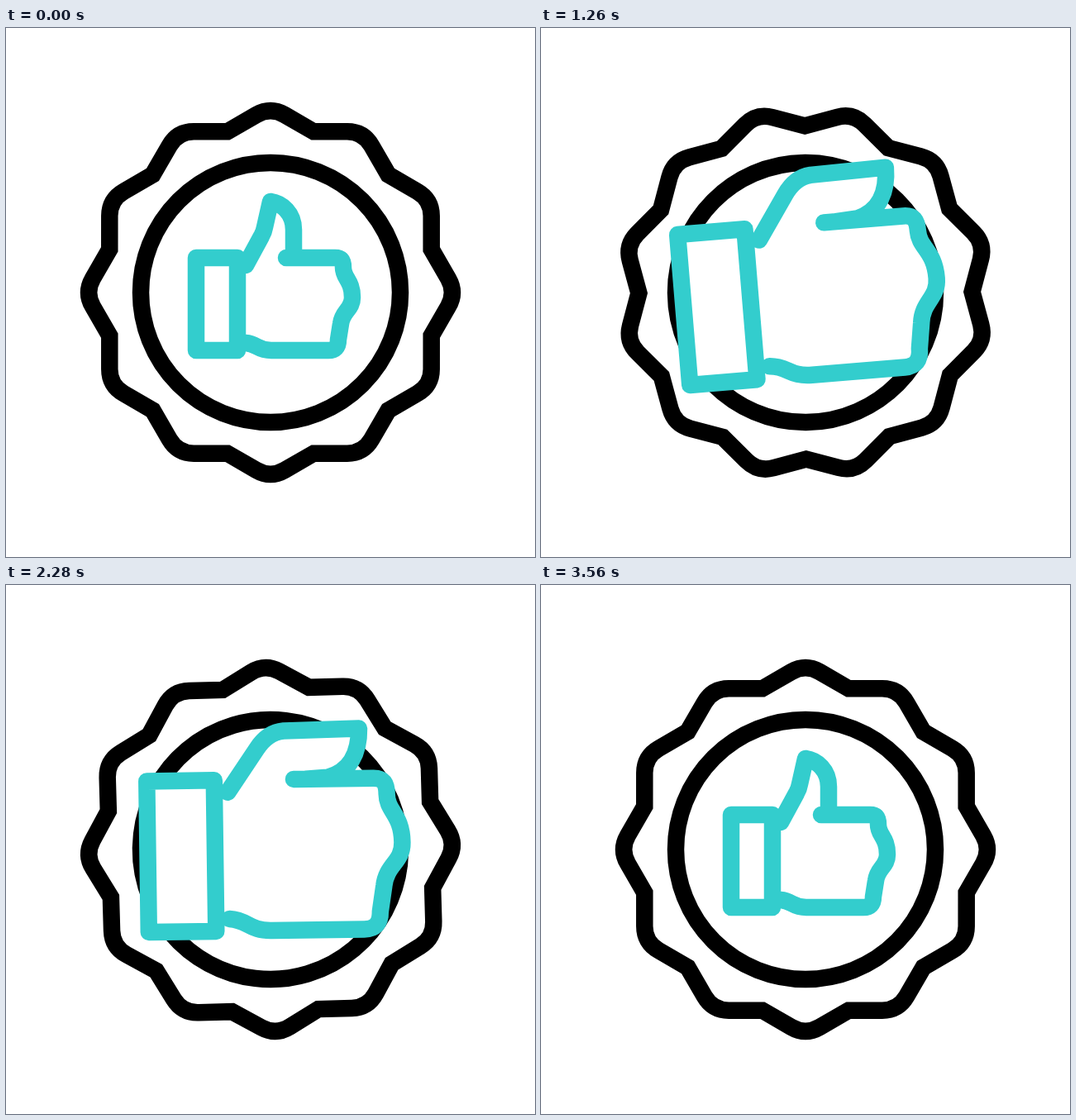
An HTML page with a canvas for the animation above (3600 ms loop, 640 px wide and 640 px high).

```html
<!DOCTYPE html>
<html lang="en">
<head>
<meta charset="utf-8">
<title>Approval badge</title>
<style>
  html, body { margin: 0; height: 100%; overflow: hidden; background: #fff; }
  canvas { display: block; }
</style>
</head>
<body>
<canvas id="stage" width="640" height="640"></canvas>
<script>
const ctx = document.getElementById('stage').getContext('2d');
const LOOP = 3600, START = 100, END = 3340, FULL = 1.63;

const cuff = 'M230 278H280V390H230Z';
const palm = 'M339 278H398C406 278 408 282 408 290C408 303 419 305 419 326' +
  'C419 341 407 342 405 358L402 377C402 386 398 390 390 390H321C304 390 304 382 290 381';
const palmAndCuff = new Path2D(cuff + palm);

// Thumb outline: each point upright, then bent
const thumb = [
  [309, 252, 312, 255], [312, 247, 320, 243], [313, 241, 332, 242], [320, 210, 388, 241],
  [334, 212, 388, 259], [348, 224, 381, 273], [348, 244, 364, 277]
];

// Nodding: time, turn in degrees, height of the hand's centre
const nods = [
  [START, 0, 313], [580, 0, 318], [1060, -17.6, 270], [1510, 13, 328],
  [1960, -17.6, 270], [2410, 3.4, 298], [2900, -17.6, 270], [END, 0, 313]
];

const mix = (a, b, k) => a + (b - a) * k;
const smooth = u => u * u * (3 - 2 * u);
const progress = (t, from, to) => Math.min(1, Math.max(0, (t - from) / (to - from)));
const phase = (t, from, to) => smooth(progress(t, from, to));

// cubic-bezier(.333, 0, .82, 1)
function spinEase(x) {
  let low = 0, high = 1;
  for (let i = 0; i < 24; i++) {
    const s = (low + high) / 2, r = 1 - s;
    if (r * r * s + 2.46 * r * s * s + s ** 3 < x) low = s; else high = s;
  }
  return smooth(low);
}

function nodAt(t) {
  const next = Math.max(1, nods.findIndex(([time]) => time >= t));
  const [a, b] = t >= END ? [nods.at(-1), nods.at(-1)] : [nods[next - 1], nods[next]];
  const k = phase(t, a[0], b[0]);
  return [mix(a[1], b[1], k), mix(a[2], b[2], k)];
}

function thumbPath(bend) {
  const p = thumb.map(([x, y, bentX, bentY]) => [mix(x, bentX, bend), mix(y, bentY, bend)]);
  const path = new Path2D();
  path.moveTo(290, 287);
  path.lineTo(...p[0]);
  path.quadraticCurveTo(...p[1], ...p[2]);
  path.lineTo(...p[3]);
  path.bezierCurveTo(...p[4], ...p[5], ...p[6]);
  path.lineTo(348, 278);
  return path;
}

function drawBadge(t) {
  ctx.strokeStyle = '#000';
  ctx.lineJoin = 'miter';
  ctx.save();
  ctx.translate(320, 320);
  ctx.rotate(Math.PI * spinEase(progress(t, START, END)));
  ctx.beginPath();
  for (let i = 0; i < 12; i++) {
    ctx.lineTo(-52.2, -194.7);
    ctx.lineTo(-17, -215);
    ctx.quadraticCurveTo(0, -224.8, 17, -215);
    ctx.rotate(Math.PI / 6);
  }
  ctx.closePath();
  ctx.stroke();
  ctx.beginPath();
  ctx.arc(0, 0, 157, 0, 2 * Math.PI);
  ctx.stroke();
  ctx.restore();
}

function drawHand(t) {
  const scale = mix(1, FULL, phase(t, START, 580) - phase(t, 2860, END));
  const bend = phase(t, 580, 1060) - phase(t, 2900, END);
  const [turn, y] = nodAt(t);
  const pose = new DOMMatrix()
    .translate(323 + 0.43 * turn, y).rotate(turn).scale(scale).translate(-323, -313);
  // Only the outline is transformed, so the line keeps its weight.
  const hand = new Path2D();
  hand.addPath(palmAndCuff, pose);
  hand.addPath(thumbPath(bend), pose);
  ctx.strokeStyle = '#33cdcd';
  ctx.fillStyle = '#fff';
  ctx.lineJoin = ctx.lineCap = 'round';
  ctx.fill(hand);
  ctx.stroke(hand);
}

function frame() {
  const t = performance.now() % LOOP;
  ctx.clearRect(0, 0, 640, 640);
  ctx.lineWidth = 20.5;
  drawBadge(t);
  drawHand(t);
  requestAnimationFrame(frame);
}
frame();
</script>
</body>
</html>
```
